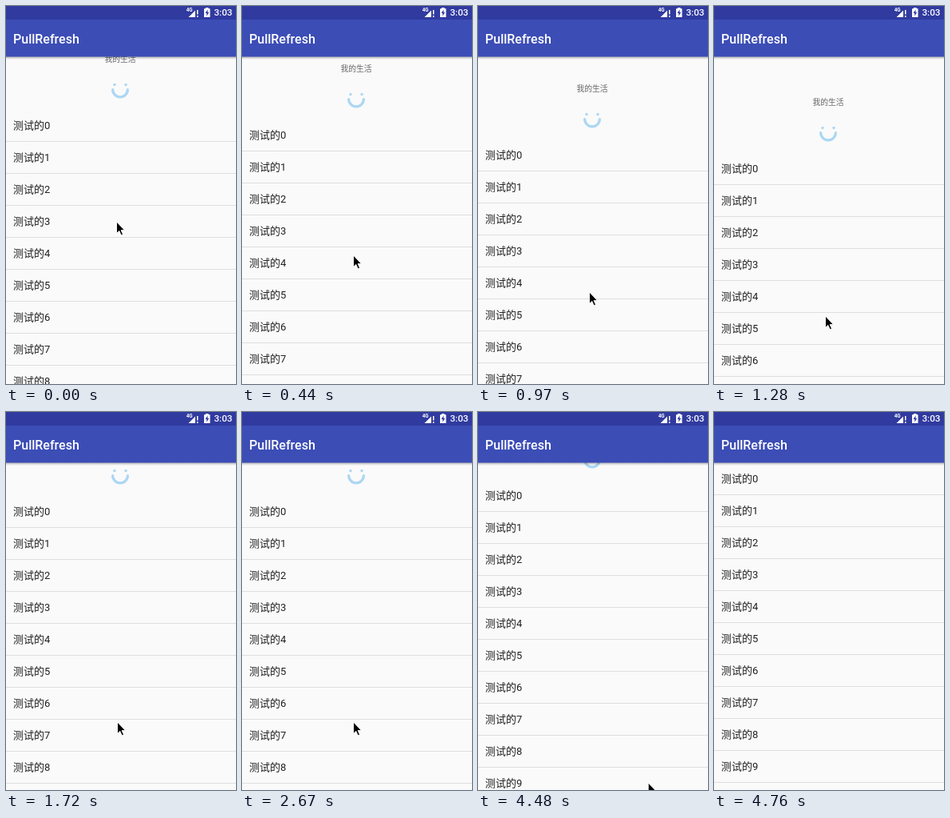
Recreate the animation shown at these times as an HTML page. Size 288 by 473 pixels, loop 5.04 s.

```html
<!DOCTYPE html>
<html lang="zh-CN">
<head>
<meta charset="utf-8">
<title>PullRefresh</title>
<style>
  html, body { margin: 0; height: 100%; overflow: hidden; background: #fafafa; }
  svg { display: block; width: 288px; height: 473px; font-family: Roboto, "Noto Sans CJK SC", "Noto Sans CJK", sans-serif; }
</style>
</head>
<body>
<svg viewBox="0 0 288 473">
  <defs>
    <linearGradient id="shade" x2="0" y2="1">
      <stop offset="0" stop-opacity=".3"/>
      <stop offset="1" stop-opacity="0"/>
    </linearGradient>
  </defs>
  <rect width="288" height="473" fill="#fafafa"/>

  <!-- y = 0 is the middle of the first row -->
  <g id="content">
    <text x="143" y="-79.3" font-size="9.8" text-anchor="middle" fill="#666">我的生活</text>
    <g transform="translate(143 -44.5)" fill="#acd7f3">
      <path id="mouth" fill="none" stroke="#acd7f3" stroke-width="3.2" stroke-linecap="round"/>
      <g id="eyes"><circle cx="-7" cy="-6" r="1.7"/><circle cx="7" cy="-6" r="1.7"/></g>
    </g>
    <g id="rows" font-size="13" fill="#212121"></g>
  </g>

  <rect y="63" width="288" height="4" fill="url(#shade)"/>
  <rect width="288" height="63.5" fill="#3c4db6"/>
  <rect width="288" height="17" fill="#303a9f"/>
  <g fill="#fff">
    <text x="9" y="47" font-size="16" font-weight="500">PullRefresh</text>
    <text x="283.5" y="12.3" font-size="11.7" font-weight="500" text-anchor="end">3:03</text>
    <text x="225.7" y="6.8" font-size="6.3" font-weight="700">4G</text>
    <path d="M228.5 14 L237 5.5 V14 Z M239 5 h1.5 v5.5 h-1.5 Z M239 12 h1.5 v2 h-1.5 Z"/>
    <path d="M248 3.2 h2 V2 h3.500 v1.200 h2 V14 h-7.500 Z"/>
    <path d="M252.500 4.500 L249.500 9 h1.800 v3.500 L254.200 8 h-1.700 Z" fill="#303a9f"/>
  </g>

  <path id="cursor" d="M0 0 V14.500 L3.300 11.400 L5.700 16.800 L8 15.800 L5.600 10.600 H10 Z"
        stroke="#fff" stroke-width=".9"/>
</svg>
<script>
const LOOP = 5040, SPIN = 1000, RADIUS = 9.4;
const $ = id => document.getElementById(id);
const content = $('content'), mouth = $('mouth'), eyes = $('eyes'), cursor = $('cursor');

$('rows').innerHTML = Array.from({ length: 11 }, (_, i) =>
  `<text x="9" y="${i * 40 + 5}">测试的${i}</text>
   <rect y="${i * 40 + 20}" width="288" height="1" fill="#dedede"/>`).join('');

const clamp = x => Math.min(1, Math.max(0, x));
const smooth = x => (1 - Math.cos(Math.PI * clamp(x))) / 2;
const easeOut = x => 1 - (1 - clamp(x)) ** 2;

// Linear interpolation through [time, value] pairs
function track(keys, t) {
  const i = keys.findIndex(k => k[0] > t);
  if (i < 0) return keys[keys.length - 1][1];
  if (i === 0) return keys[0][1];
  const [t0, a] = keys[i - 1], [t1, b] = keys[i];
  return a + (b - a) * (t - t0) / (t1 - t0);
}

const pull = [[0, 149], [440, 161], [500, 167], [740, 177], [1280, 203]];
const cursorX = [[0, 138.5], [440, 139.5], [3420, 139.5], [3740, 165.5], [3840, 167], [4370, 205], [4560, 219]];
const cursorY = [[0, 270], [440, 312], [740, 343], [1280, 388], [3420, 388], [3740, 402], [3840, 403], [4370, 447], [4560, 476]];

function contentY(t) {
  if (t < 1330) return track(pull, t);
  if (t < 4370) return 203 - 79 * easeOut((t - 1330) / 310);
  return 124 - 41 * easeOut((t - 4370) / 390);
}

function point(degrees) {
  const a = degrees * Math.PI / 180;
  return `${RADIUS * Math.cos(a)} ${RADIUS * Math.sin(a)}`;
}

function drawSmile(t) {
  let tail = 360, head = 540, eyeAlpha = 1;
  if (t >= 1740 && t < 4390) {
    const p = (t - 1740) % SPIN / SPIN;
    tail = 180 + 180 * smooth(p / 0.5);
    head = Math.max(tail + 0.5, 180 + 360 * smooth(p / 0.85));
    eyeAlpha = clamp((p - 0.6) / 0.25);
  }
  const large = head - tail > 180 ? 1 : 0;
  mouth.setAttribute('d', `M${point(tail)} A${RADIUS} ${RADIUS} 0 ${large} 1 ${point(head)}`);
  eyes.setAttribute('opacity', eyeAlpha);
}

function frame() {
  let t = performance.now() % LOOP;
  // The drag updates in coarse steps
  if (t < 1690) t = Math.max(0, 20 + 60 * Math.floor((t - 20) / 60));
  content.setAttribute('transform', `translate(0 ${Math.round(contentY(t))})`);
  cursor.setAttribute('transform', `translate(${track(cursorX, t)} ${track(cursorY, t)})`);
  drawSmile(t);
  requestAnimationFrame(frame);
}
frame();
</script>
</body>
</html>
```
